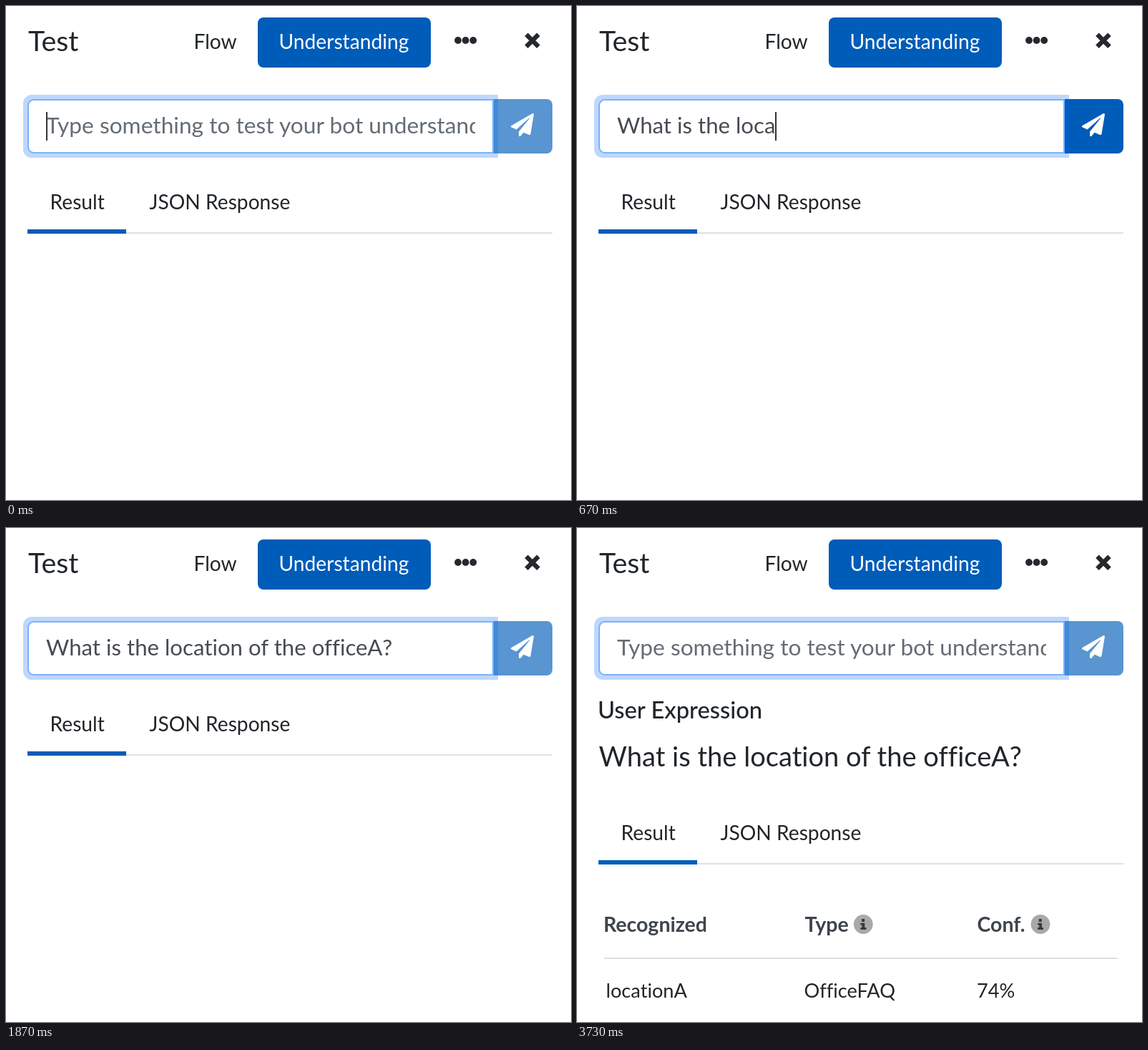
Animation of 790 by 690 pixels, one loop 4070 ms. Source, as an HTML page:

```html
<!DOCTYPE html>
<html lang="en">
<head>
<meta charset="utf-8">
<title>Bot test panel</title>
<style>
  html, body { margin: 0; width: 100%; height: 100%; overflow: hidden; background: #fff; }
  svg { display: block; width: 790px; height: 690px; }
  text {
    font: 28.2px Lato, "Open Sans", sans-serif;
    font-variant-ligatures: none;
    white-space: pre;
    fill: #212529;
  }
  text.big { font-size: 38.1px; }
  text.title { font-size: 39.4px; }
  text.sub { font-size: 32.7px; font-weight: 500; }
  text.head { font-size: 28.5px; font-weight: 700; fill: #3e444b; }
  text.cell { font-size: 27.2px; }
  text.field { font-size: 31.2px; fill: #454b53; }
  text.hint { font-size: 31.7px; fill: #646c75; }
  .blue { fill: #005cb9; }
  .rule { fill: #dee0e4; }
</style>
</head>
<body>
<svg viewBox="0 0 790 690" xmlns="http://www.w3.org/2000/svg">
  <defs>
    <clipPath id="inner"><rect x="56" y="140" width="600" height="56"/></clipPath>
    <g id="info">
      <circle r="13.4" fill="#a7a9ab"/>
      <path d="M-2.2-7.5h4v4h-4zM-3.8-1.8h5.8v6.4h2v2.9h-7.8v-2.9h2v-3.5h-2z" fill="#363b40"/>
    </g>
  </defs>

  <text class="title" x="31" y="62.5">Test</text>
  <text x="262.5" y="60">Flow</text>
  <rect class="blue" x="352" y="16" width="242" height="70" rx="8"/>
  <text x="381.5" y="60" style="fill:#fff">Understanding</text>
  <g fill="#25292d">
    <circle cx="632" cy="48" r="4.9"/>
    <circle cx="642.6" cy="48" r="4.9"/>
    <circle cx="653.2" cy="48" r="4.9"/>
  </g>
  <path d="M727.5 39.7l17 17m0-17l-17 17" stroke="#25292d" stroke-width="6.4"/>

  <path id="send" class="blue" d="M682 130h74a8 8 0 0 1 8 8v60a8 8 0 0 1-8 8h-74z"/>
  <path transform="translate(706 150) scale(.0625)" fill="#fff"
    d="M476 3.2L12.5 270.6c-18.1 10.4-15.8 35.6 2.2 43.2L121 358.4l287.3-253.2c5.5-4.9 13.3 2.6 8.6 8.3L176 407v80.5c0 23.6 28.5 32.9 42.5 15.8L282 426l124.6 52.2c14.2 6 30.4-2.9 33-18.2l72-432C515 7.8 493.3-6.8 476 3.2z"/>
  <!-- focus ring, lying over the edge of the send button -->
  <path d="M688 124H36a12 12 0 0 0-12 12v64a12 12 0 0 0 12 12h652z" fill="#0060f0" fill-opacity=".25"/>
  <path d="M681 131H39a8 8 0 0 0-8 8v58a8 8 0 0 0 8 8h642z" fill="#fff" stroke="#76b4fb" stroke-width="2"/>
  <g clip-path="url(#inner)">
    <text id="hint" class="hint" x="56" y="178">Type something to test your bot understanding</text>
    <text id="typed" class="field" x="56" y="178" xml:space="preserve"></text>
  </g>
  <rect id="caret" x="56" y="148" width="2" height="40" fill="#30353a"/>

  <g id="tabs">
    <text x="61.5" y="284">Result</text>
    <text x="200.5" y="284">JSON Response</text>
    <rect class="rule" x="30" y="316" width="734" height="2"/>
    <rect class="blue" x="30" y="312" width="138" height="6"/>
  </g>

  <g id="answer">
    <text class="sub" x="29" y="266">User Expression</text>
    <text class="big" x="30.5" y="333">What is the location of the officeA?</text>
    <text class="head" x="37" y="564">Recognized</text>
    <text class="head" x="318.5" y="564">Type</text>
    <text class="head" x="559.5" y="564">Conf.</text>
    <use href="#info" x="400.3" y="553.5"/>
    <use href="#info" x="648" y="553.5"/>
    <rect class="rule" x="38" y="600" width="718" height="2"/>
    <text class="cell" x="40.5" y="656">locationA</text>
    <text class="cell" x="317.5" y="656">OfficeFAQ</text>
    <text class="cell" x="559" y="656">74%</text>
  </g>
</svg>
<script>
  const LOOP = 4070, SENT = 1670, ANSWERED = 2130;
  const QUESTION = 'What is the location of the officeA?';
  // Characters present after each typing tick (15 ticks per second).
  const TYPED = [0, 2, 3, 5, 6, 8, 10, 11, 13, 14, 16, 18, 20, 22, 24, 26, 28,
                 29, 30, 31, 32, 33, 34, 35];
  const tickTime = k => Math.round(k * 20 / 3) * 10;
  const CARET_FLIPS = [1870, ANSWERED, 2670, 3200, 3730];

  const el = id => document.getElementById(id);
  const [hint, typed, caret, send, tabs, answer] =
    ['hint', 'typed', 'caret', 'send', 'tabs', 'answer'].map(el);
  const show = (node, on) => node.setAttribute('visibility', on ? 'visible' : 'hidden');

  function charsAt(t) {
    if (t >= ANSWERED) return 0;
    if (t >= SENT) return QUESTION.length;
    return TYPED.filter((n, k) => tickTime(k) <= t).pop();
  }

  function draw(t) {
    const count = charsAt(t), done = t >= ANSWERED;
    typed.textContent = QUESTION.slice(0, count);
    const width = count ? typed.getComputedTextLength() : 0;
    caret.setAttribute('x', Math.round(56 + width));
    show(caret, CARET_FLIPS.filter(f => f <= t).length % 2 === 0);
    show(hint, count === 0);
    show(answer, done);
    send.setAttribute('opacity', count && t < SENT ? 1 : 0.65);
    tabs.setAttribute('transform', `translate(0 ${done ? 152 : 0})`);
  }

  const start = performance.now();
  function frame() {
    draw((performance.now() - start) % LOOP);
    requestAnimationFrame(frame);
  }
  frame();
</script>
</body>
</html>
```
